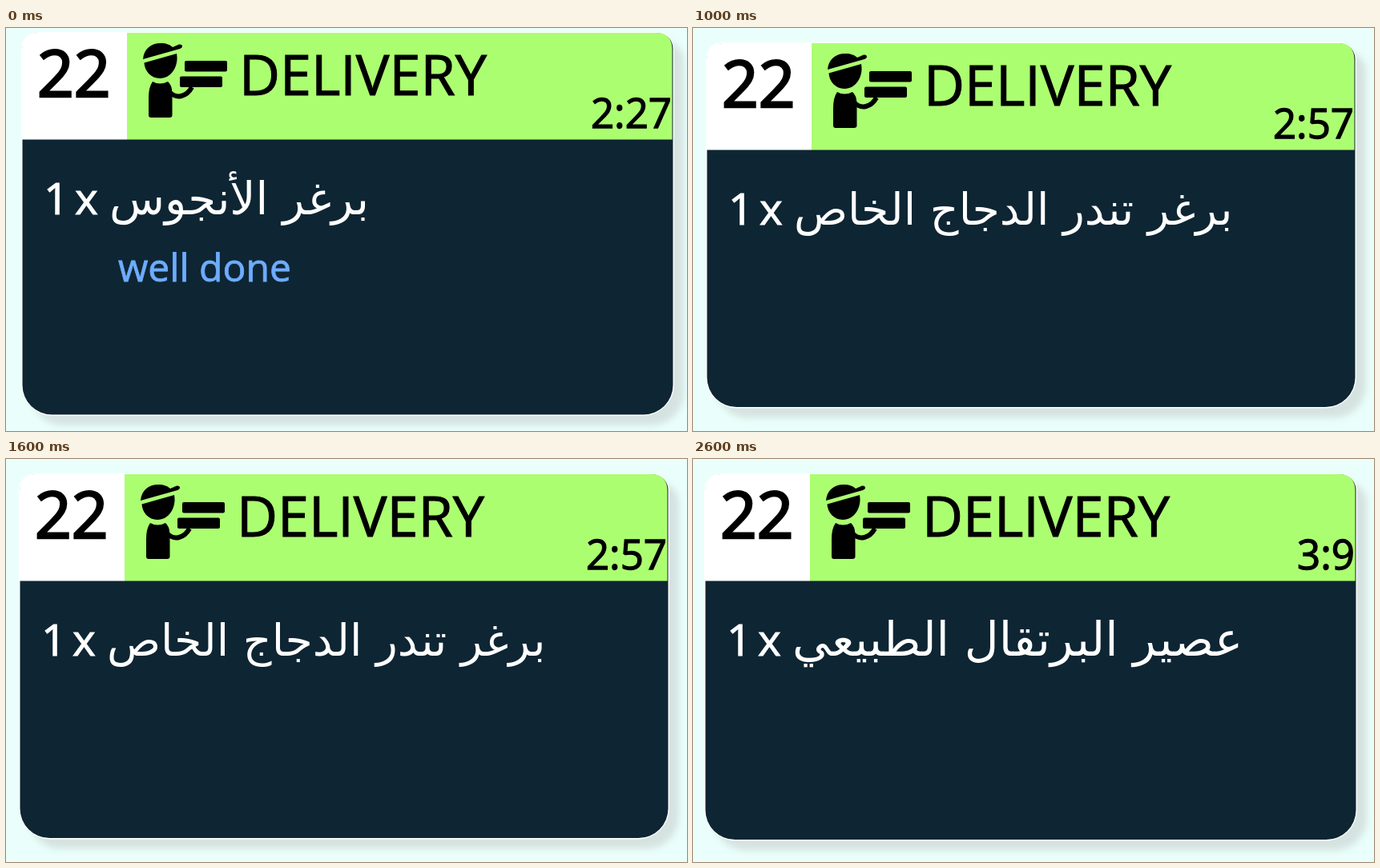
Recreate the animation shown at these times as an HTML page. Size 850 by 504 pixels, loop 3 s.

```html
<!DOCTYPE html>
<html lang="en">
<head>
<meta charset="utf-8">
<title>Kitchen order card</title>
<style>
  html, body { margin: 0; width: 100%; height: 100%; overflow: hidden; background: #eafffb; }
  svg { display: block; width: 850px; height: 504px; }
  text { font-family: "Open Sans", sans-serif; stroke: currentColor; fill: currentColor; white-space: pre; }
  .arabic { font-family: "DejaVu Sans", sans-serif; stroke: none; }
  .shadow { filter: blur(4px); }
</style>
</head>
<body>
<svg id="stage" viewBox="0 0 850 504"></svg>
<script>
const stage = document.getElementById("stage");

const orders = [
  { left: 19, top: 5, right: 834, bottom: 485, time: "2:27", dish: "برغر الأنجوس", size: 56.5, note: "well done" },
  { left: 16, top: 18, right: 828, bottom: 475.5, time: "2:57", dish: "برغر تندر الدجاج الخاص", size: 55.5 },
  { left: 14, top: 18, right: 829, bottom: 477.5, time: "3:9", dish: "عصير البرتقال الطبيعي", size: 59 },
];

// Rectangle with separate top and bottom corner radii
const panel = (x, y, w, h, top, bottom) =>
  `M${x + top} ${y}h${w - 2 * top}a${top} ${top} 0 0 1 ${top} ${top}v${h - top - bottom}` +
  `a${bottom} ${bottom} 0 0 1 ${-bottom} ${bottom}h${2 * bottom - w}` +
  `a${bottom} ${bottom} 0 0 1 ${-bottom} ${-bottom}v${top + bottom - h}a${top} ${top} 0 0 1 ${top} ${-top}z`;

const label = (x, y, size, weight, content, color, extra = "") =>
  `<text x="${x}" y="${y}" font-size="${size}" stroke-width="${weight}" color="${color}" ${extra}>${content}</text>`;

// Courier carrying two boxes, relative to the card corner
const courier = `
  <path d="M152 34C153 21 162 14 174 14C181 14 186 16 189 19L197 15.5Q201 15 201 18Q201 20 198 21Z"/>
  <path d="M153.5 38.5L194 27C197 43 187 58 173 58C162 58 154 49 153.5 38.5Z"/>
  <path d="M164 62Q173 67 183 62Q188 66 188.500 76V104Q188.500 107 185 107H162Q159 107 159 104V82Q159 69 164 62Z"/>
  <path d="M185 75Q192 82 200 80Q208 78 213 69" fill="none" stroke="#000" stroke-width="6"/>
  <rect x="204" y="36" width="53" height="13.500" rx="2"/>
  <rect x="198" y="55.500" width="53" height="13.500" rx="2"/>`;

function card({ left, top, right, bottom, time, dish, size, note }) {
  const w = right - left, h = bottom - top;
  return `
    <path class="shadow" d="${panel(12, 12, w, h, 24, 40)}" fill="#d5e3e0"/>
    <path d="${panel(0, 0, w, h, 21, 39)}" fill="#fff"/>
    <path d="${panel(1.5, 1.5, w - 3, h - 3, 19, 37)}" fill="#0e2533"/>
    <path d="M1 134.500V22Q1 1 22 1H132V134.500Z" fill="#fff"/>
    <path d="M132 1H${w - 23}Q${w - 2.5} 1 ${w - 2.5} 22V134.500H132Z" fill="#acfe71"/>
    ${courier}
    ${label(20, 81, 80, 2.6, "22", "#000")}
    ${label(272, 79, 70, 1.1, "DELIVERY", "#000")}
    ${label(w - 3, 120, 51, 1.3, time, "#000", 'text-anchor="end"')}
    ${label(28, 228, 55, 1.1, "1", "#fff")}
    ${label(67, 228, 55, 1.1, "x", "#fff")}
    ${label(110, 228, size, 0, dish, "#fff", 'class="arabic"')}
    ${note ? label(121, 312, 48, 0.8, note, "#6eacff") : ""}`;
}

stage.innerHTML = orders.map(order =>
  `<g transform="translate(${order.left} ${order.top})">${card(order)}</g>`).join("");
const cards = [...stage.children];

function draw() {
  const current = Math.floor(performance.now() / 1000) % cards.length;
  cards.forEach((group, i) => group.style.display = i === current ? "" : "none");
  requestAnimationFrame(draw);
}
draw();
</script>
</body>
</html>
```
